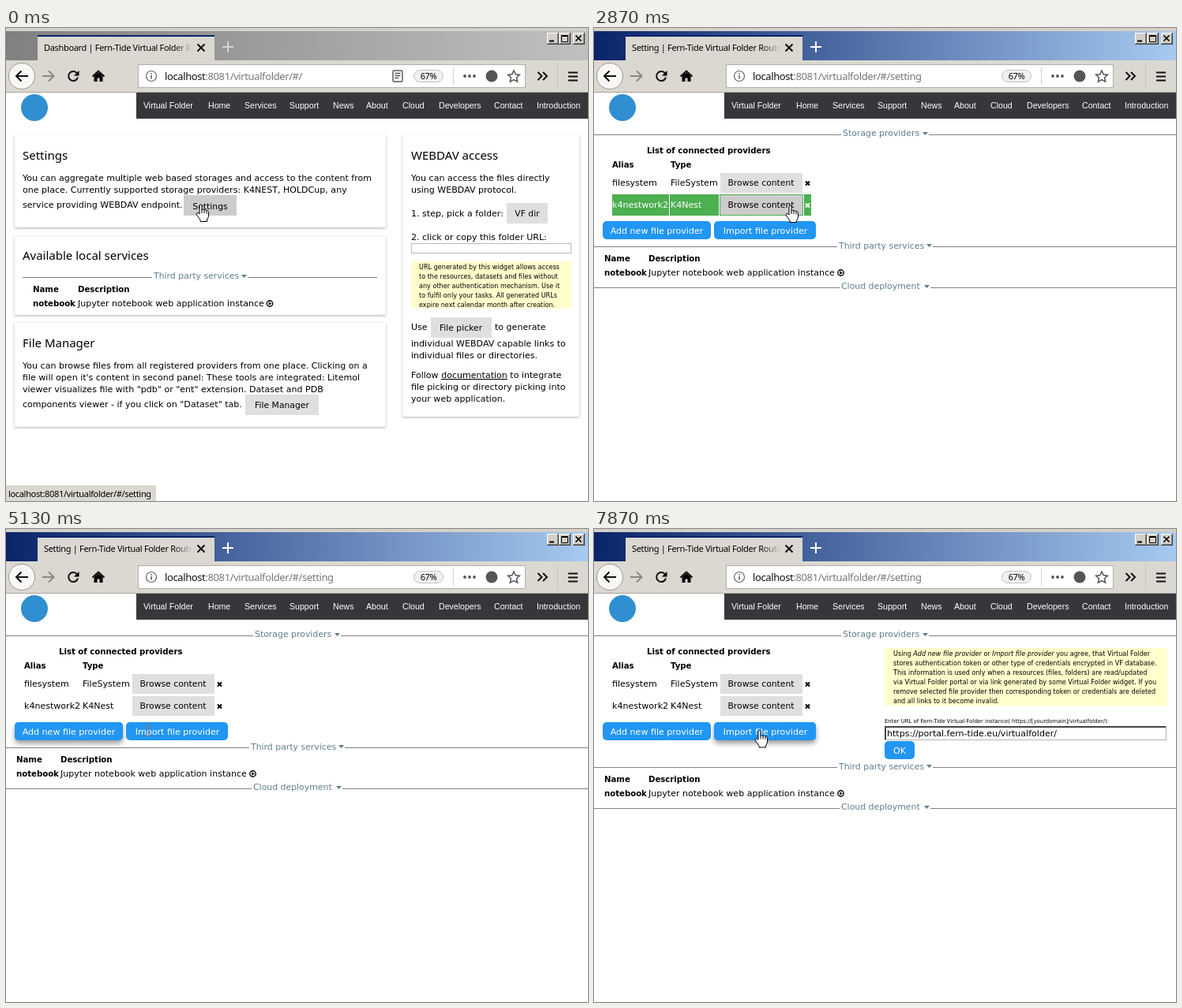
These frames come from a looping animation (737 px wide and 600 px high, 8 s). An HTML page:

```html
<!DOCTYPE html>
<html lang="en">
<head>
<meta charset="utf-8">
<title>Virtual Folder settings</title>
<style>
html, body { margin: 0; width: 100%; height: 100%; overflow: hidden; background: #fff; }
svg { display: block; font: 11.05px "DejaVu Sans", Verdana, sans-serif; }
text { white-space: pre; }
.h { font: 15px "Noto Sans", sans-serif; }
.ui { font: 11px "Noto Sans", Tahoma, sans-serif; letter-spacing: -.03em; }
.url { font-size: 13px; }
.nav { font: 10.6px "Liberation Sans", Arial, sans-serif; fill: #fff; }
.b { font-weight: bold; font-size: 10.2px; letter-spacing: -.03px; }
.btn { font-size: 10.8px; }
.s { font-size: 8.1px; }
.xs { font-size: 6.9px; }
.mid { text-anchor: middle; }
.sec { fill: #607d8b; font-size: 10.9px; }
.rule { stroke: #808080; fill: none; }
.grey { fill: #dfdfdf; }
.blue { fill: #2196f3; }
.line { fill: none; stroke: #111; stroke-width: 2; }
.card { fill: #fff; filter: drop-shadow(0 1px 1.5px rgba(0, 0, 0, .32)); }
.lift { fill: #2196f3; filter: drop-shadow(0 4px 3px rgba(0, 0, 0, .4)); }

/* One 8 s clock for everything; most changes are hard cuts. */
.t { opacity: 0; animation: 8s step-end infinite; }
.home { animation-name: home; }
.first { animation-name: first; }
.active { animation-name: active; }
.list { animation-name: list; }
.early { animation-name: early; }
.link1 { animation-name: link1; }
.link2 { animation-name: link2; }
.row1 { animation-name: row1; }
.row2 { animation-name: row2; }
.over1 { animation-name: over1; }
.over2 { animation-name: over2; }
.lift1 { animation-name: lift1; }
.lift2 { animation-name: lift2; }
.tip { animation-name: tip; }
.form { animation-name: form; }
.busy { animation-name: busy; }
.ready { animation-name: ready; }
.hand { animation-name: hand; }
.arrow { animation-name: arrow; }
.beam { animation-name: beam; }
.shift { animation: shift 8s step-end infinite; }
.spin { animation: spin 8s linear infinite; }
.cursor { animation: move 8s step-end infinite; }

@keyframes home { 0% { opacity: 1 } 30% { opacity: 0 } }
@keyframes first { 0% { opacity: 0 } 30% { opacity: 1 } 34.1% { opacity: 0 } }
@keyframes active { 0% { opacity: 0 } 30% { opacity: 1 } }
@keyframes list { 0% { opacity: 0 } 34.1% { opacity: 1 } }
@keyframes early { 0% { opacity: 1 } 34.1% { opacity: 0 } }
@keyframes link1 { 0% { opacity: 1 } .84% { opacity: 0 } }
@keyframes link2 { 0% { opacity: 0 } 36.6% { opacity: 1 } 60.8% { opacity: 0 } }
@keyframes row1 { 0% { opacity: 0 } 50% { opacity: 1 } 56.6% { opacity: 0 } }
@keyframes row2 { 0% { opacity: 0 } 35% { opacity: 1 } 50% { opacity: 0 } 56.6% { opacity: 1 } 60% { opacity: 0 } }
@keyframes over1 { 0% { opacity: 0 } 49.1% { opacity: 1 } 53.3% { opacity: 0 } }
@keyframes over2 { 0% { opacity: 0 } 35% { opacity: 1 } 49.1% { opacity: 0 } }
@keyframes lift1 {
  0% { opacity: 0 }
  60% { opacity: 0; animation-timing-function: linear }
  61.6% { opacity: 1 }
  64.1% { opacity: 1; animation-timing-function: linear }
  66.6% { opacity: 0 }
}
@keyframes lift2 {
  0% { opacity: 0 }
  64.1% { opacity: 0; animation-timing-function: linear }
  66.6% { opacity: 1 }
}
@keyframes tip { 0% { opacity: 0 } 75.85% { opacity: 1 } 81.6% { opacity: 0 } }
@keyframes form { 0% { opacity: 0 } 83.3% { opacity: 1 } }
@keyframes busy { 0% { opacity: 1 } 95% { opacity: 0 } }
@keyframes ready {
  0% { opacity: 0 }
  95% { opacity: .3; animation-timing-function: ease }
  98.3% { opacity: 1 }
  100% { opacity: 1 }
}
@keyframes shift { 0% { transform: none } 83.3% { transform: translateY(25px) } }
@keyframes spin { 0%, 83.3% { transform: none } 100% { transform: rotate(240deg) } }
@keyframes hand { 0% { opacity: 1 } 53% { opacity: 0 } 69.1% { opacity: 1 } }
@keyframes arrow { 0% { opacity: 0 } 53% { opacity: 1 } 63.3% { opacity: 0 } 65% { opacity: 1 } 69.1% { opacity: 0 } }
@keyframes beam { 0% { opacity: 0 } 63.3% { opacity: 1 } 65% { opacity: 0 } }
@keyframes move {
  0% { transform: translate(247px, 224px) }
  30% { transform: translate(249px, 225px) }
  49.1% { transform: translate(255px, 206px); animation-timing-function: linear }
  50.8% { transform: translate(246px, 200px); animation-timing-function: linear }
  55.85% { transform: translate(117.5px, 218px); animation-timing-function: linear }
  59.1% { transform: translate(113px, 235px); animation-timing-function: linear }
  61.6% { transform: translate(135px, 252px) }
  63.3% { transform: translate(150px, 254px); animation-timing-function: linear }
  64.1% { transform: translate(180px, 256px); animation-timing-function: linear }
  66.6% { transform: translate(210px, 255.5px) }
}
</style>
</head>
<body>
<svg width="737" height="600" viewBox="0 0 737 600">
<defs>
  <linearGradient id="bar"><stop stop-color="#0a246a"/><stop offset="1" stop-color="#a6caf0"/></linearGradient>
  <linearGradient id="dim"><stop stop-color="#808080"/><stop offset="1" stop-color="#c0c0c0"/></linearGradient>
  <linearGradient id="fade"><stop stop-color="#dbd8d1" stop-opacity="0"/><stop offset="1" stop-color="#dbd8d1"/></linearGradient>
  <clipPath id="note"><rect x="513" y="296" width="203" height="59.5"/></clipPath>
  <path id="caret" d="M0 0h7l-3.500 4z" fill="#607d8b"/>
  <g id="play"><circle r="3.700" fill="none" stroke="#000" stroke-width="1.400"/><path d="M-1.300-2.200L2.400 0L-1.300 2.200z"/></g>
  <g id="winbtn"><path d="M0 0h15v15h-15z" fill="#404040"/><path d="M0 0h14v14h-14z" fill="#fff"/><path d="M1 1h13v13h-13z" fill="#808080"/><path d="M1 1h12v12h-12z" fill="#d4d0c8"/></g>
  <g id="cells" fill="#4caf50"><path d="M23 183h72v27h-72zM96 183h62v27h-62zM159 183h106v27h-106zM266 183h9v27h-9z"/></g>
  <path id="cross" d="M268 194.500l5 5m0-5l-5 5" stroke-width="2"/>
  <g id="row1"><text x="23" y="200">filesystem</text><text x="97" y="200">FileSystem</text></g>
  <g id="row2"><text x="23" y="228">k4nestwork2</text><text x="97" y="228">K4Nest</text></g>
  <g id="storage">
    <path class="rule" d="M0 135.500h313M424 135.500h313"/>
    <text class="sec" x="315" y="137">Storage providers</text><use href="#caret" x="416" y="132"/>
  </g>
  <g id="third">
    <path class="rule" d="M0 1.500h308M429 1.500h308"/>
    <text class="sec" x="310" y="3.500">Third party services</text><use href="#caret" x="421" y="-2"/>
  </g>
  <g id="cloud">
    <path class="rule" d="M0 1.500h311M426 1.500h311"/>
    <text class="sec" x="313" y="3">Cloud deployment</text><use href="#caret" x="418" y="-2"/>
  </g>
  <rect id="add" x="11" y="245" width="137" height="23" rx="5"/>
  <rect id="import" x="152" y="245" width="129" height="23" rx="5"/>
  <g id="actions">
    <use href="#add" class="blue"/><use href="#import" class="blue"/>
    <g class="mid" fill="#fff"><text x="79.500" y="260.500">Add new file provider</text><text x="217" y="260.500">Import file provider</text></g>
  </g>
  <g id="ok"><rect class="blue" x="368" y="269" width="38" height="23" rx="5"/><text class="mid" x="387" y="285" fill="#fff">OK</text></g>
</defs>

<rect width="737" height="600" fill="#fff"/>

<!-- browser window -->
<rect width="737" height="82" fill="#d4d0c8"/>
<rect y="4" width="737" height="37" fill="url(#dim)"/>
<rect class="t active" y="4" width="737" height="37" fill="url(#bar)"/>
<rect x="40" y="9" width="224" height="33" fill="#dbd8d1"/>
<rect x="40" y="9" width="224" height="2" fill="#0a246a"/>
<g class="ui">
  <text class="t early" x="48" y="29">Dashboard | Fern-Tide Virtual Folder R</text>
  <text class="t list" x="48" y="29">Setting | Fern-Tide Virtual Folder Route</text>
</g>
<rect x="212" y="14" width="24" height="22" fill="url(#fade)"/>
<rect x="236" y="14" width="22" height="22" fill="#dbd8d1"/>
<path class="line" d="M242.500 20.500l9 9m0-9l-9 9"/>
<path d="M281 17v14M274 24h14" stroke="#d8d5ce" stroke-width="2"/>
<path class="t active" d="M281 17v14M274 24h14" stroke="#fff" stroke-width="2"/>
<use href="#winbtn" x="685" y="6"/><use href="#winbtn" x="700" y="6"/><use href="#winbtn" x="718" y="6"/>
<path d="M688 16.500h6" stroke="#000" stroke-width="2"/>
<path d="M703.500 9.500h8v8h-8zM703 10.500h9" fill="none" stroke="#000"/>
<path d="M721.500 9.500l7 7m0-7l-7 7" stroke="#000" stroke-width="1.700"/>

<rect y="41" width="737" height="41" fill="#dbd8d1"/>
<path d="M0 81.500h737" stroke="#aaa69f"/>
<circle cx="20" cy="61" r="16.500" fill="#f8f7f6" stroke="#9c9993"/>
<path class="line" d="M28 61h-15M19.500 54.500l-6.500 6.500l6.500 6.500"/>
<path class="line" style="stroke:#8c8983" d="M46 61h14M54 54.500l6.500 6.500l-6.500 6.500"/>
<path class="line" d="M90 57.500a6 6 0 1 0 1 5"/><path d="M92.500 54v6.500h-6.500z"/>
<path class="line" d="M109.500 61.500l7.500-7l7.500 7"/><path d="M111.500 61l5.500-5l5.500 5v7h-4v-4.500h-3v4.500h-4z"/>
<rect x="167.500" y="46.500" width="490" height="29" fill="#fff" stroke="#b3afa8"/>
<circle cx="184" cy="61" r="6.500" fill="none" stroke="#666" stroke-width="1.200"/>
<path d="M184 60v4.500M184 57v1.700" stroke="#555" stroke-width="1.500"/>
<text class="ui url t home" x="201" y="66" fill="#777"><tspan fill="#111">localhost</tspan>:8081/virtualfolder/#/</text>
<text class="ui url t active" x="201" y="66" fill="#777"><tspan fill="#111">localhost</tspan>:8081/virtualfolder/#/setting</text>
<g class="t early" fill="none" stroke="#555" stroke-width="1.400">
  <rect x="490" y="54" width="12" height="14" rx="1.500"/><path d="M492.500 57.500h7M492.500 60.500h7M492.500 63.500h4.500"/>
</g>
<rect x="516.500" y="53.500" width="37" height="15" rx="7.500" fill="#f0f0f1" stroke="#c4c4c6"/>
<text class="ui mid" x="535" y="65">67%</text>
<path d="M566.500 50v22" stroke="#d0d0d0"/>
<g fill="#555"><circle cx="581" cy="61" r="1.900"/><circle cx="587" cy="61" r="1.900"/><circle cx="593" cy="61" r="1.900"/><circle cx="615" cy="61" r="7.500"/></g>
<path d="M643 54l2.200 4.800l5.200.6l-3.900 3.500l1.100 5.200l-4.600-2.600l-4.600 2.600l1.100-5.200l-3.900-3.500l5.200-.6z" fill="none" stroke="#555" stroke-width="1.500"/>
<path class="line" d="M673.500 56l5 5l-5 5M680 56l5 5l-5 5"/>
<path d="M698.500 45v32" stroke="#c8c4bd"/>
<path class="line" d="M712 56.500h12M712 61.500h12M712 66.500h12"/>

<!-- site header -->
<circle cx="36" cy="101" r="17" fill="#2f8fd0"/>
<rect x="165" y="82" width="572" height="33" fill="#36373b"/>
<g class="nav">
  <text x="174" y="102">Virtual Folder</text><text x="256" y="102">Home</text><text x="302" y="102">Services</text>
  <text x="359" y="102">Support</text><text x="414" y="102">News</text><text x="456" y="102">About</text>
  <text x="502" y="102">Cloud</text><text x="548" y="102">Developers</text><text x="618" y="102">Contact</text>
  <text x="672" y="102">Introduction</text>
</g>

<!-- dashboard -->
<g class="t home">
  <rect class="card" x="11" y="136" width="470" height="117"/>
  <rect class="card" x="11" y="264" width="470" height="100"/>
  <rect class="card" x="11" y="374" width="470" height="132"/>
  <rect class="card" x="502" y="136" width="224" height="357"/>
  <g class="h">
    <text x="21" y="167">Settings</text><text x="21" y="294">Available local services</text>
    <text x="21" y="405">File Manager</text><text x="513" y="167">WEBDAV access</text>
  </g>
  <text x="21" y="194">You can aggregate multiple web based storages and access to the content from</text>
  <text x="21" y="209">one place. Currently supported storage providers: K4NEST, HOLDCup, any</text>
  <text x="21" y="228">service providing WEBDAV endpoint.</text>
  <rect x="225" y="212" width="67" height="26" fill="#ccc"/>
  <text class="btn mid" x="258.500" y="229.500">Settings</text>

  <path class="rule" d="M21 316.500h164M306 316.500h164"/>
  <text class="sec" x="187" y="318">Third party services</text><use href="#caret" x="298" y="313"/>
  <g class="b"><text x="34" y="335">Name</text><text x="91" y="335">Description</text><text x="34" y="353">notebook</text></g>
  <text x="91" y="353">Jupyter notebook web application instance</text><use href="#play" x="334" y="349.500"/>

  <text x="21" y="432">You can browse files from all registered providers from one place. Clicking on a</text>
  <text x="21" y="447">file will open it's content in second panel: These tools are integrated: Litemol</text>
  <text x="21" y="462">viewer visualizes file with "pdb" or "ent" extension. Dataset and PDB</text>
  <text x="21" y="481">components viewer - if you click on "Dataset" tab.</text>
  <rect class="grey" x="303" y="465" width="93" height="26"/>
  <text class="btn mid" x="349.500" y="482">File Manager</text>

  <text x="513" y="194">You can access the files directly</text>
  <text x="513" y="209">using WEBDAV protocol.</text>
  <text x="513" y="238.500">1. step, pick a folder:</text>
  <rect class="grey" x="634" y="222" width="52" height="26"/>
  <text class="btn mid" x="660" y="239">VF dir</text>
  <text x="513" y="269">2. click or copy this folder URL:</text>
  <rect x="513.500" y="273.500" width="202" height="12" fill="#fff" stroke="#bbb"/>
  <g class="s" clip-path="url(#note)">
    <rect x="513" y="296" width="203" height="60" fill="#ffc"/>
    <text x="523" y="305.500">URL generated by this widget allows access</text>
    <text x="523" y="318">to the resources, datasets and files without</text>
    <text x="523" y="330">any other authentication mechanism. Use it</text>
    <text x="523" y="342">to fulfil only your tasks. All generated URLs</text>
    <text x="523" y="354">expire next calendar month after creation.</text>
  </g>
  <text x="513" y="383">Use</text>
  <rect class="grey" x="538" y="367" width="77" height="26"/>
  <text class="btn mid" x="576" y="384">File picker</text>
  <text x="619" y="383">to generate</text>
  <text x="513" y="404">individual WEBDAV capable links to</text>
  <text x="513" y="419">individual files or directories.</text>
  <text x="513" y="444">Follow <tspan text-decoration="underline">documentation</tspan> to integrate</text>
  <text x="513" y="459">file picking or directory picking into</text>
  <text x="513" y="474">your web application.</text>
</g>

<!-- settings, loading -->
<g class="t first">
  <use href="#storage"/>
  <g class="b"><text x="99" y="159">List of connected providers</text><text x="23" y="177">Alias</text><text x="195" y="177">Type</text></g>
  <text x="23" y="200">Loading available providers ...</text>
  <rect class="grey" x="225" y="183" width="104" height="26"/>
  <text class="btn mid" x="276.500" y="200">Browse content</text>
  <use href="#actions" y="-29"/>
  <use href="#third" y="247"/>
  <g class="b"><text x="13" y="268">Name</text><text x="48" y="268">Description</text></g>
  <use href="#cloud" y="283"/>
</g>

<!-- settings, loaded -->
<g class="t list">
  <use href="#storage"/>
  <g class="b"><text x="67" y="159">List of connected providers</text><text x="23" y="177">Alias</text><text x="97" y="177">Type</text></g>
  <use href="#row1"/><use href="#row2"/>
  <g stroke="#000"><use href="#cross"/><use href="#cross" y="28"/></g>
  <g class="t row1" fill="#fff"><use href="#cells"/><use href="#row1"/><use href="#cross" stroke="#fff"/></g>
  <g class="t row2" fill="#fff"><use href="#cells" y="28"/><use href="#row2"/><use href="#cross" y="28" stroke="#fff"/></g>
  <path class="grey" d="M160 184h104v25h-104zM160 212h104v25h-104z"/>
  <path class="t over1" d="M160 184h104v25h-104z" fill="#ccc"/>
  <path class="t over2" d="M160 212h104v25h-104z" fill="#ccc"/>
  <g class="btn mid"><text x="211.500" y="200">Browse content</text><text x="211.500" y="228">Browse content</text></g>
  <g class="shift">
    <use href="#third" y="276"/>
    <g class="b"><text x="13" y="296">Name</text><text x="69" y="296">Description</text><text x="13" y="314">notebook</text></g>
    <text x="69" y="314">Jupyter notebook web application instance</text><use href="#play" x="312.500" y="310.500"/>
    <use href="#cloud" y="328"/>
  </g>
  <g class="t lift1"><use href="#add" class="lift"/></g>
  <g class="t lift2"><use href="#import" class="lift"/></g>
  <use href="#actions"/>
</g>

<!-- import form -->
<g class="t form">
  <rect x="368" y="151" width="358" height="73" fill="#ffc"/>
  <g class="s">
    <text x="379" y="161">Using <tspan font-style="italic">Add new file provider</tspan> or <tspan font-style="italic">Import file provider</tspan> you agree, that Virtual Folder</text>
    <text x="379" y="173">stores authentication token or other type of credentials encrypted in VF database.</text>
    <text x="379" y="185">This information is used only when a resources (files, folders) are read/updated</text>
    <text x="379" y="197">via Virtual Folder portal or via link generated by some Virtual Folder widget. If you</text>
    <text x="379" y="209">remove selected file provider then corresponding token or credentials are deleted</text>
    <text x="379" y="221">and all links to it become invalid.</text>
  </g>
  <text class="xs" x="368" y="246">Enter URL of Fern-Tide Virtual Folder instance( https://[yourdomain]/virtualfolder/):</text>
  <rect x="368.500" y="250.500" width="356" height="17" fill="#fff" stroke="#b5b2ab"/>
  <path d="M369 267v-16h355" fill="none" stroke="#444" stroke-width="2"/>
  <text x="371" y="263">https://portal.fern-tide.eu/virtualfolder/</text>
  <g class="t busy">
    <g transform="translate(374.500 281)"><g class="spin">
      <circle r="2.500" fill="none" stroke="#000" stroke-width="2"/>
      <circle r="3.800" fill="none" stroke="#000" stroke-width="1.600" stroke-dasharray="1.600 1.385"/>
    </g></g>
    <text class="xs" x="385" y="284">Generating keys for import. Wait for couple of seconds.</text>
    <use href="#ok" x="209" opacity=".3"/>
  </g>
  <g class="t ready"><use href="#ok"/></g>
</g>

<g class="t tip">
  <rect x="209.500" y="277.500" width="214" height="20" fill="#ffffe1" stroke="#000"/>
  <text class="ui" x="215" y="291.500">Import file provider from other instance</text>
</g>

<!-- link preview -->
<g class="t link1"><path d="M0 580h190v20h-190z" fill="#dbd8d1"/><text class="ui" x="3" y="595">localhost:8081/virtualfolder/#/setting</text></g>
<g class="t link2"><path d="M0 580h213v20h-213z" fill="#dbd8d1"/><text class="ui" x="3" y="595">localhost:8081/virtualfolder/#/filemanager</text></g>

<g class="cursor">
  <g class="t hand" fill="#fff" stroke="#000">
    <path d="M-2 12V1.500Q-2 0-.5 0T1 1.500V7Q1 6 2.300 6T4 7.500Q4 6.500 5.300 6.700T7 8.300Q7 7.600 8.200 7.800T9.500 9.500V14Q9.500 17 7.500 19V21.500H-1V19.500L-5.500 13Q-6.500 11-5 10.400Q-3.700 10-2 12Z"/>
    <path d="M1 7v4M4 7.500v3.500M7 8.500v3"/>
  </g>
  <path class="t arrow" d="M.5.500V17L4 13.500L7 20.500L9.500 19.500L6.700 12.500H11.500Z" fill="#fff" stroke="#000"/>
  <path class="t beam" d="M-2.500-6.500h2l.5.500l.5-.5h2M0-6v12M-2.500 6.500h2l.5-.5l.5.500h2" fill="none" stroke="#c8691c"/>
</g>
</svg>
</body>
</html>
```
